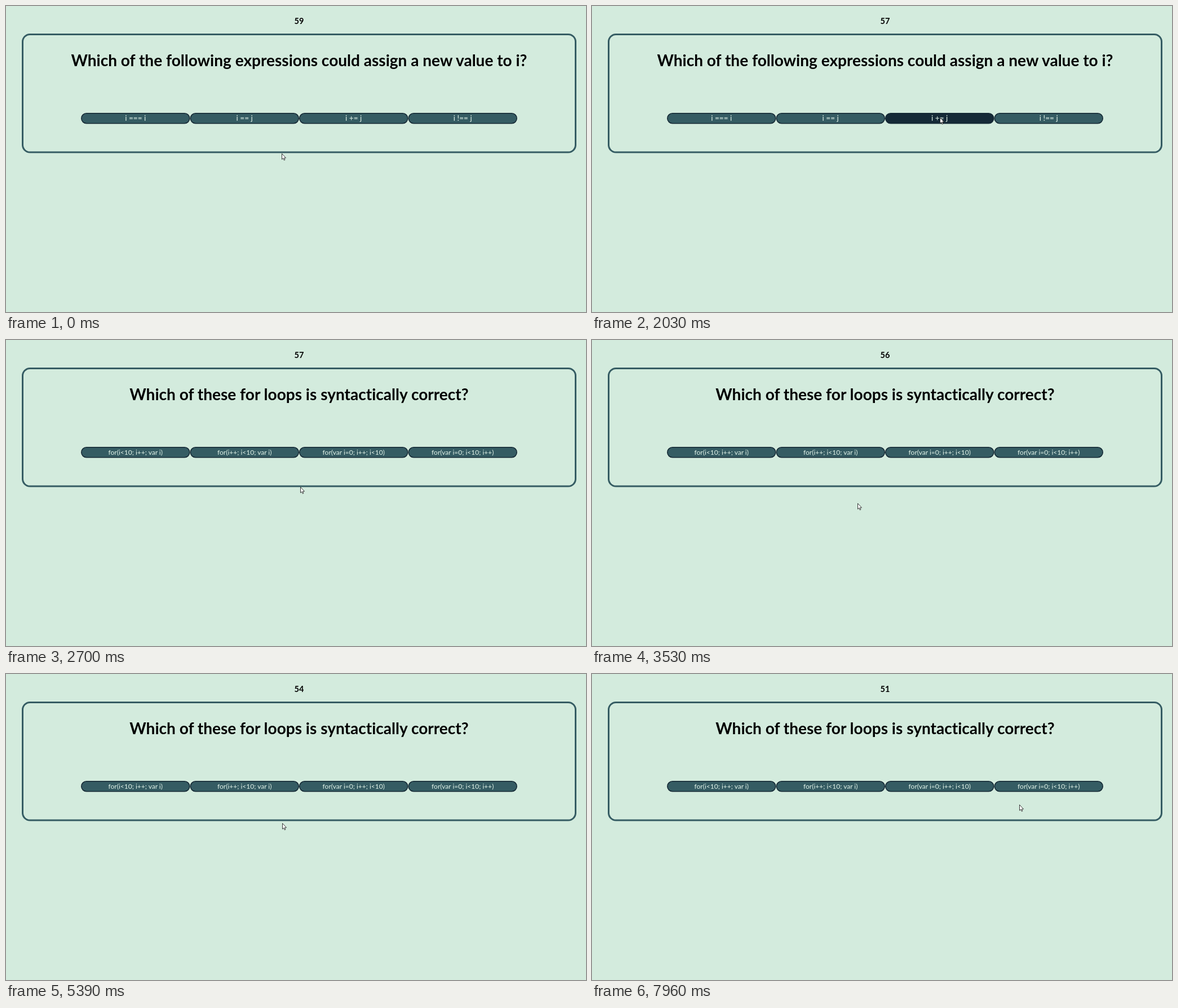
Write an HTML page that moves like this. It is 1029 by 544 pixels and loops after 8 s.

```html
<!DOCTYPE html>
<html lang="en">
<head>
<meta charset="utf-8">
<title>Quiz</title>
<style>
  html, body { margin: 0; width: 100%; height: 100%; overflow: hidden; background: #d3ebdd; }
  svg { display: block; width: 1029px; height: 544px; }
  text {
    font-family: Lato, "Open Sans", sans-serif;
    font-variant-ligatures: none;
    text-anchor: middle;
  }
  #count { font-size: 14.5px; font-weight: 700; }
  .title { font-size: 28.05px; font-weight: 700; }
  .card { fill: none; stroke: #355c63; stroke-width: 3; }
  .option rect { fill: #355c63; stroke: #132733; stroke-width: 1.5; }
  .option.hover rect { fill: #152a37; }
  .option text { fill: #e3f5ea; }
  #cursor { fill: #fff; stroke: #222; stroke-width: .9; stroke-linejoin: round; }
</style>
</head>
<body>
<svg viewBox="0 0 1029 544">
  <text id="count" x="520" y="32"></text>
  <rect class="card" x="29.5" y="50.5" width="981" height="209.5" rx="13"/>
  <g id="questions"></g>
  <path id="cursor" d="M.5 .5V10.7L2.8 8.6L4.3 12.2L5.9 11.5L4.4 8.1H7.5Z"/>
</svg>
<script>
const LOOP = 8000;
const QUESTION_CHANGE = 2460;
const COUNT = { from: 59, offset: 90, period: 960 };
const ROW = { x: 133, y: 190, width: 193.5, height: 19.5 };

const QUESTIONS = [
  { title: 'Which of the following expressions could assign a new value to i?',
    size: 13.6, options: ['i === i', 'i == j', 'i += j', 'i !== j'] },
  { title: 'Which of these for loops is syntactically correct?',
    size: 12, options: ['for(i<10; i++; var i)', 'for(i++; i<10; var i)',
      'for(var i=0; i++; i<10)', 'for(var i=0; i<10; i++)'] }
];

// The pointer rests between strokes and moves in discrete steps within one.
const STEP = 120;
const POINTER_START = { x: 489, y: 262 };
const STROKES = [
  { at: 530, steps: 2, x: 627, y: 257, power: 4 },
  { at: 1490, steps: 2, x: 617, y: 198, power: 1.3 },
  { at: 2580, steps: 3, x: 474, y: 292 },
  { at: 3530, steps: 2, x: 461, y: 284, power: 2 },
  { at: 3930, steps: 3, x: 440, y: 265 },
  { at: 5150, steps: 3, x: 490, y: 265 },
  { at: 5540, steps: 4, x: 641, y: 249 },
  { at: 7010, steps: 3, x: 669, y: 227 },
  { at: 7810, steps: 2, x: 758, y: 232, power: 3 }
];

const byId = id => document.getElementById(id);

function add(parent, tag, attrs, text = '') {
  const node = document.createElementNS('http://www.w3.org/2000/svg', tag);
  for (const key in attrs) node.setAttribute(key, attrs[key]);
  node.textContent = text;
  return parent.appendChild(node);
}

const views = QUESTIONS.map(({ title, size, options }) => {
  const group = add(byId('questions'), 'g', {});
  add(group, 'text', { class: 'title', x: 520, y: 106.6 }, title);
  const buttons = options.map((label, i) => {
    const x = ROW.x + i * ROW.width;
    const button = add(group, 'g', { class: 'option' });
    add(button, 'rect', { x: x + .75, y: ROW.y + .75,
      width: ROW.width - 1.5, height: ROW.height - 1.5, rx: 9 });
    add(button, 'text', { x: x + ROW.width / 2, y: 204.3, 'font-size': size }, label);
    return button;
  });
  return { group, buttons };
});

function pointerAt(t) {
  let { x, y } = POINTER_START;
  for (const stroke of STROKES) {
    if (t < stroke.at) break;
    const done = Math.min(stroke.steps, Math.floor((t - stroke.at) / STEP) + 1);
    const eased = (done / stroke.steps) ** (stroke.power ?? 1);
    x += (stroke.x - x) * eased;
    y += (stroke.y - y) * eased;
  }
  return { x: Math.round(x), y: Math.round(y) };
}

function hoveredOption({ x, y }) {
  const inRow = y >= ROW.y && y < ROW.y + ROW.height;
  return inRow ? Math.floor((x - ROW.x) / ROW.width) : -1;
}

function render(now) {
  const t = now % LOOP;
  const pointer = pointerAt(t);
  const hovered = hoveredOption(pointer);
  const current = t < QUESTION_CHANGE ? 0 : 1;
  const elapsed = Math.max(0, Math.floor((t - COUNT.offset) / COUNT.period));

  byId('count').textContent = COUNT.from - elapsed;
  byId('cursor').setAttribute('transform', `translate(${pointer.x} ${pointer.y})`);
  views.forEach(({ group, buttons }, i) => {
    group.style.display = i === current ? '' : 'none';
    buttons.forEach((button, j) => button.classList.toggle('hover', j === hovered));
  });
}

const start = performance.now();
function loop() {
  render(performance.now() - start);
  requestAnimationFrame(loop);
}
loop();
</script>
</body>
</html>
```
